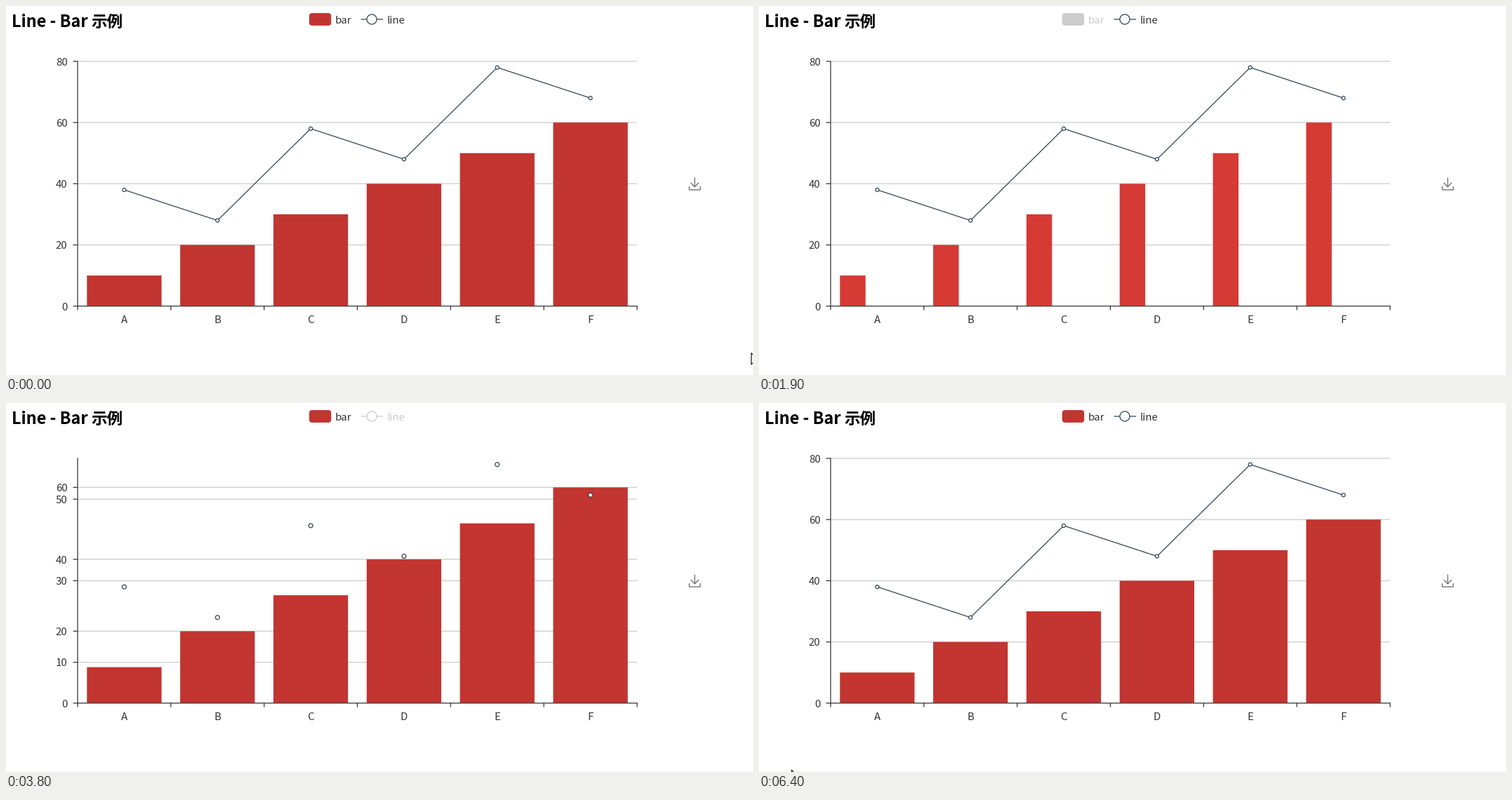
Animation of 1064x526 px, one loop 6.9 s. Source, as a matplotlib script:

```python
import matplotlib.pyplot as plt
import numpy as np
from matplotlib.animation import FuncAnimation
from matplotlib.patches import Circle, FancyBboxPatch, Polygon, Rectangle

W, H, DPI = 1064, 526, 100
STEP, FRAMES = 100, 69
PX = 72 / DPI

LEFT, RIGHT, TOP, BASE = 102, 898.9, 78.9, 427.8
RED, RED_HOVER, NAVY = '#c23531', '#d53a35', '#2f4554'
DARK, GREY = '#333333', '#cccccc'
FONT = 'Noto Sans CJK JP'

NAMES = 'ABCDEF'
BARS = np.arange(10, 70, 10)
LINE = np.array([38, 28, 58, 48, 78, 68])
BAND = (RIGHT - LEFT) / len(NAMES)
XS = LEFT + BAND * (np.arange(len(NAMES)) + 0.5)
BAR_W = BAND * 0.8
R, R_HOVER = 2.5, 6.2

# when each legend action happens (ms)
BAR_HOVER, BAR_OFF, BAR_ON = 1400, 1800, 2800
LINE_HOVER, LINE_OFF, LINE_ON = 3300, 3800, 4700

fig = plt.figure(figsize=(W / DPI, H / DPI), dpi=DPI, facecolor='white')
ax = fig.add_axes([0, 0, 1, 1])


def cubic_out(t):
    return 1 - (1 - np.clip(t, 0, 1)) ** 3


def elastic_out(t):
    if t >= 1:
        return 1
    return 1 + 2 ** (-10 * t) * np.sin((t - 0.1) * 2 * np.pi / 0.4)


def y_of(value, top=80):
    return BASE - (BASE - TOP) * value / top


def text(x, y, s, color=DARK, size=15, ha='left', **kw):
    ax.text(x, y, s, color=color, fontsize=size * PX, family=FONT, ha=ha,
            va='baseline', zorder=6, **kw)


def stroke(xs, ys, color, width=1.25, z=1):
    ax.plot(xs, ys, color=color, lw=width * PX, zorder=z, snap=False,
            solid_capstyle='butt')


def dot(x, y, r, color=NAVY, z=5):
    ax.add_patch(Circle((x, y), r, fc='white', ec=color, lw=1.25 * PX,
                        zorder=z))


def header(bar_on, line_on):
    text(8.5, 29.5, 'Line - Bar', 'black', 23.4, weight='bold')
    text(121.8, 29.5, '示例', 'black', 22.6, weight='bold')
    ax.add_patch(FancyBboxPatch((436, 14.3), 23, 9.4, lw=0,
                                boxstyle='round,pad=4.2,rounding_size=4.2',
                                fc=RED if bar_on else GREY))
    text(469, 25, 'bar', DARK if bar_on else GREY)
    color = NAVY if line_on else GREY
    stroke([505.5, 537], [19, 19], color)
    dot(521, 19, 7, color)
    text(543, 25, 'line', DARK if line_on else GREY)


def download_icon():
    for xs, ys in (([981, 981], [244.5, 258]),
                   ([975.3, 981, 986.7], [252, 257.8, 252]),
                   ([973.2, 973.2, 988.9, 988.9], [257, 262, 262, 257])):
        stroke(xs, ys, '#666666')


def axis_mix(t):
    """Share of the 0-60 scale (against 0-80) at time t."""
    if t < LINE_OFF:
        return 0
    if t < LINE_ON:
        return cubic_out((t - LINE_OFF + 66) / 300)
    return 1 - cubic_out((t - LINE_ON + 68) / 300)


def scaled(value, mix):
    return y_of(value) * (1 - mix) + y_of(value, 60) * mix


def axes_lines(t, mix):
    short = LINE_OFF <= t < LINE_ON
    for v in range(0, 61, 10) if short else range(0, 81, 20):
        if v % 20:
            y = y_of(v, 60)
        else:
            y = TOP if v == 80 else scaled(v, mix)
        if v:
            stroke([LEFT, RIGHT], [y, y], GREY)
        stroke([95.5, LEFT], [y, y], DARK, z=4)
        text(87.5, y + 5.8, str(v), ha='right')
    stroke([LEFT, LEFT], [TOP - 0.6, BASE + 0.6], DARK, z=4)
    stroke([LEFT, RIGHT + 0.6], [BASE, BASE], DARK, z=4)
    for i in range(len(NAMES) + 1):
        x = LEFT + BAND * i
        stroke([x, x], [BASE, 433.5], DARK, z=4)
    for x, name in zip(XS, NAMES):
        text(x, 451.5, name, ha='center')


def bars(t, mix):
    share = 1
    if BAR_OFF <= t < BAR_ON:
        share = 1 - cubic_out((t - BAR_OFF - 10) / 300)
    elif t >= BAR_ON:
        share = cubic_out((t - BAR_ON + 40) / 300)
    if share * BAR_W < 0.3:
        return
    color = RED_HOVER if BAR_HOVER <= t < BAR_ON else RED
    for x, v in zip(XS, BARS):
        y = scaled(v, mix)
        ax.add_patch(Rectangle((x - BAR_W / 2, y), BAR_W * share, BASE - y,
                               fc=color, lw=0, zorder=2, snap=False))
        if BAR_HOVER <= t < BAR_OFF:
            text(x, y - 6.2, str(v), 'black', ha='center')


def line(t):
    ys = y_of(LINE)
    hover = LINE_HOVER <= t < LINE_OFF
    r, end = R, XS[-1]
    if hover:
        r += (R_HOVER - R) * elastic_out((t - LINE_HOVER + 80) / 400)
    elif LINE_OFF <= t < LINE_ON:
        r, end = R_HOVER * (1 - axis_mix(t)), 0
    elif t >= LINE_ON:
        r = R * (1 - axis_mix(t))
        reach = LEFT + (RIGHT - LEFT) * cubic_out((t - LINE_ON + 48) / 1000)
        end = min(end, reach)
    if end > XS[0]:
        seen = np.append(XS[XS < end], end)
        stroke(seen, np.interp(seen, XS, ys), NAVY, z=3)
    for x, y, v in zip(XS, ys, LINE):
        if r > 0.2:
            dot(x, y, r)
        if hover:
            text(x, y - r - 7.5, str(v), 'black', ha='center')


def glide(t, start, stop, a, b):
    k = (t - start) / (stop - start)
    return a[0] + (b[0] - a[0]) * k, a[1] + (b[1] - a[1]) * k


def pointer(t):
    if t < 200:
        x, y = 1061.5 + t / 60, 494.5
    elif 900 <= t < BAR_HOVER:
        x, y = glide(t, 900, 1300, (496, 2.5), (474, 12.5))
    elif 5400 <= t < 5700:
        x, y = glide(t, 5400, 5600, (380, 46.5), (10.5, 230))
    elif t >= 5900:
        x, y = glide(min(t, 6400), 5900, 6400, (0.5, 354.5), (46.5, 523))
    else:
        return
    shape = [(0, 0), (0, 16.5), (3.8, 13), (6.3, 18), (8.5, 17), (6.2, 12),
             (11, 12)]
    ax.add_patch(Polygon(np.array(shape) + (x, y), fc='white', ec='black',
                         lw=PX, zorder=9))


def draw(n):
    t = n * STEP
    ax.clear()
    ax.set(xlim=(0, W), ylim=(H, 0))
    ax.axis('off')
    mix = axis_mix(t)
    header(not BAR_OFF <= t < BAR_ON, not LINE_OFF <= t < LINE_ON)
    download_icon()
    axes_lines(t, mix)
    bars(t, mix)
    line(t)
    pointer(t)
    return []


anim = FuncAnimation(fig, draw, frames=FRAMES, interval=STEP, repeat=True,
                     repeat_delay=0, init_func=lambda: [])
plt.show()
```
